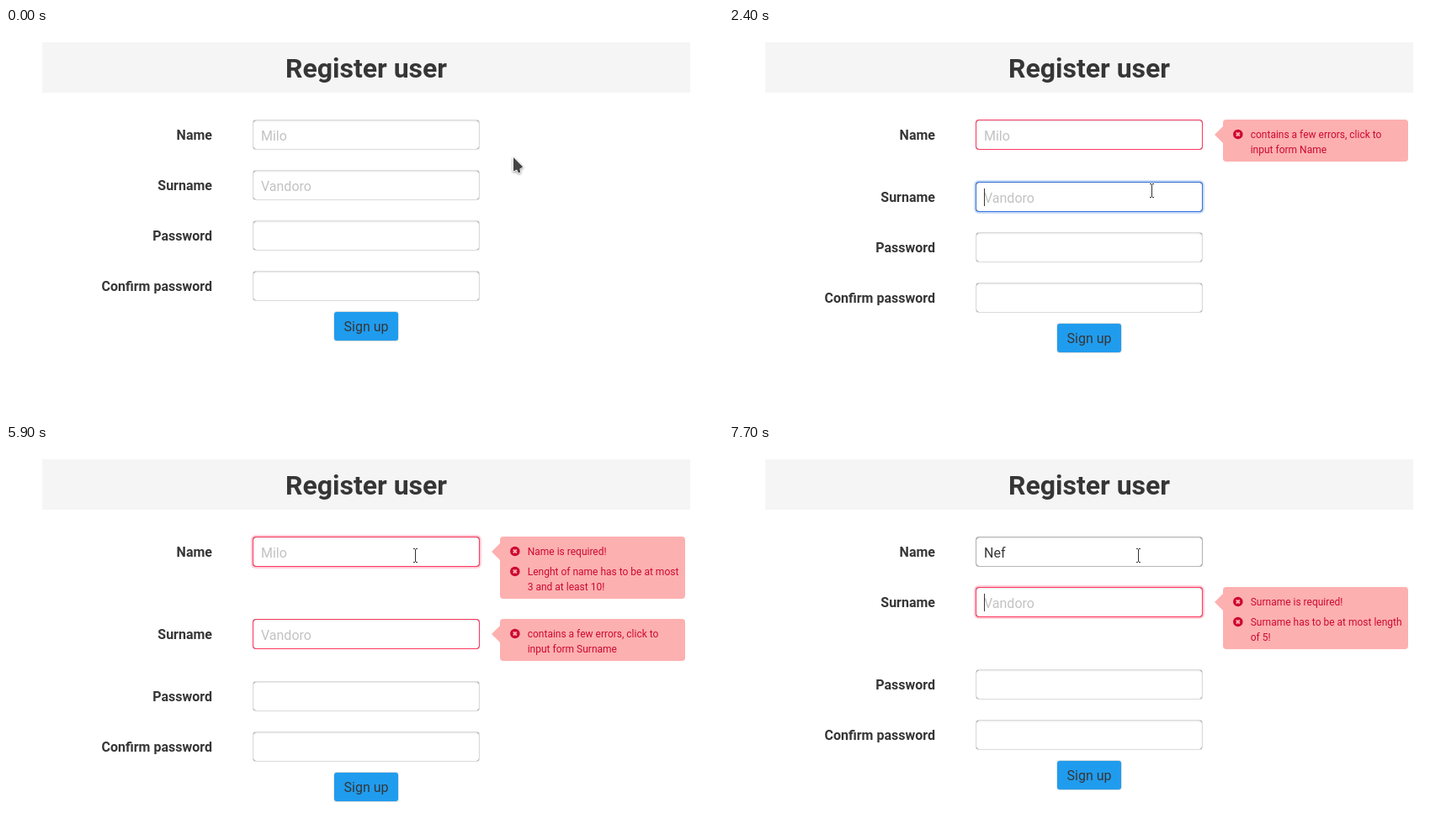
These frames come from a looping animation (852 by 463 pixels, 8000 ms). An HTML page with a canvas:

```html
<!DOCTYPE html>
<html lang="en">
<head>
<meta charset="utf-8">
<title>Register user</title>
<style>
  html, body { margin: 0; width: 100%; height: 100%; overflow: hidden; background: #fff; }
  canvas { display: block; }
</style>
</head>
<body>
<canvas id="stage" width="852" height="463"></canvas>
<script>
const ctx = document.getElementById('stage').getContext('2d');
const LOOP = 8000, STEP = 100, BLINK = 600;
const INK = '#363636', BLUE = '#3273dc', RED = '#ff3860', TIP = '#fdb0b0', ERROR = '#cd0930';
const FIELD = { x: 293, w: 270, h: 36 };
const LABELS = ['Name', 'Surname', 'Password', 'Confirm password'];
const PLACEHOLDERS = ['Milo', 'Vandoro', '', ''];

// Each tip is a list of messages, each message a list of lines.
const summary = name => [['contains a few errors, click to', 'input form ' + name]];
const nameLength = ['Lenght of name has to be at most', '3 and at least 10!'];
const nameErrors = [['Name is required!'], nameLength];
const surnameErrors = [['Surname is required!'], ['Surname has to be at most length', 'of 5!']];

const STATES = [
  { at: 0, focus: -1, text: '', tips: [] },
  { at: 1500, focus: 0, text: '', tips: [] },
  { at: 2400, focus: 1, text: '', tips: [summary('Name')] },
  { at: 4100, focus: 0, text: '', tips: [nameErrors, summary('Surname')] },
  { at: 6200, focus: 0, text: 'N', tips: [[nameLength], summary('Surname')] },
  { at: 6700, focus: 0, text: 'Ne', tips: [[nameLength], summary('Surname')] },
  { at: 7200, focus: 0, text: 'Nef', tips: [null, summary('Surname')] },
  { at: 7700, focus: 1, text: 'Nef', tips: [null, surnameErrors] }
];

const START = { x: 603, y: 154 };
const MOVES = [
  { at: 400, steps: 7, x: 499, y: 136 },
  { at: 1700, steps: 5, x: 502, y: 192 },
  { at: 2300, steps: 1, x: 502, y: 193 },
  { at: 3000, steps: 7, x: 486, y: 131 }
];

function pointerAt(t) {
  let { x, y } = START;
  for (const m of MOVES) {
    if (t < m.at) break;
    const p = Math.min(1, ((t - m.at) / STEP + 1) / m.steps);
    const e = p * p * (3 - 2 * p);
    x += (m.x - x) * e;
    y += (m.y - y) * e;
  }
  return { x: Math.round(x), y: Math.round(y) };
}

function write(text, x, y, font, color, align = 'left') {
  ctx.font = font + ' Roboto, sans-serif';
  ctx.textAlign = align;
  ctx.fillStyle = color;
  ctx.fillText(text, x, y);
}

function box(x, y, w, h, r, color) {
  ctx.fillStyle = color;
  ctx.beginPath();
  ctx.roundRect(x, y, w, h, r);
  ctx.fill();
}

function shape(points, color) {
  ctx.beginPath();
  points.forEach(([x, y]) => ctx.lineTo(x, y));
  ctx.closePath();
  ctx.fillStyle = color;
  ctx.fill();
}

function innerShadow(x, y, w, h) {
  ctx.save();
  ctx.beginPath();
  ctx.roundRect(x, y, w, h, 3);
  ctx.clip();
  ctx.shadowColor = 'rgba(10,10,10,.1)';
  ctx.shadowBlur = 2;
  ctx.shadowOffsetY = 1;
  ctx.beginPath();
  ctx.rect(x - 10, y - 10, w + 20, h + 20);
  ctx.roundRect(x, y, w, h, 3);
  ctx.fillStyle = '#000';
  ctx.fill('evenodd');
  ctx.restore();
}

function drawField(y, { focused, invalid, hovered, value, placeholder, caret }) {
  const { x, w, h } = FIELD;
  const border = invalid ? RED : focused ? BLUE : hovered ? '#b5b5b5' : '#dbdbdb';
  if (focused) {
    box(x - 2, y - 2, w + 4, h + 4, 6, invalid ? 'rgba(255,56,96,.25)' : 'rgba(50,115,220,.25)');
  }
  box(x, y, w, h, 4, border);
  box(x + 1, y + 1, w - 2, h - 2, 3, '#fff');
  innerShadow(x + 1, y + 1, w - 2, h - 2);
  write(value || placeholder, x + 10, y + 25, '16px', value ? INK : 'rgba(54,54,54,.3)');
  if (caret) {
    const advance = value ? Math.round(ctx.measureText(value).width) : 0;
    ctx.fillStyle = INK;
    ctx.fillRect(x + 10 + advance, y + 8, 1, 21);
  }
}

function drawErrorIcon(x, y) {
  ctx.beginPath();
  ctx.arc(x, y, 5.8, 0, 7);
  ctx.fillStyle = ERROR;
  ctx.fill();
  ctx.beginPath();
  for (const d of [-2, 2]) {
    ctx.moveTo(x - 2, y - d);
    ctx.lineTo(x + 2, y + d);
  }
  ctx.strokeStyle = TIP;
  ctx.lineWidth = 1.8;
  ctx.stroke();
}

function tipHeight(tip) {
  return tip ? 8 + tip.reduce((sum, lines) => sum + 6 + 18 * lines.length, 0) : 0;
}

function drawTip(tip, y) {
  box(587, y, 220, tipHeight(tip), 4, TIP);
  shape([[577, y + 18], [587, y + 8], [587, y + 28]], TIP);
  let baseline = y + 22;
  for (const lines of tip) {
    drawErrorIcon(604.8, baseline - 4.5);
    for (const line of lines) {
      write(line, 619.7, baseline, '12px', ERROR);
      baseline += 18;
    }
    baseline += 6;
  }
}

function drawArrow(x, y) {
  ctx.save();
  ctx.translate(x, y);
  ctx.lineJoin = 'round';
  ctx.shadowColor = 'rgba(0,0,0,.35)';
  ctx.shadowBlur = 3;
  ctx.shadowOffsetY = 1;
  const outline = [[0, 0], [0, 16.5], [4, 14.5], [6, 18.5], [8.3, 17.5], [7.4, 13.7], [11.2, 11.2]];
  shape(outline, '#444');
  ctx.strokeStyle = '#fff';
  ctx.lineWidth = 1.6;
  ctx.stroke();
  ctx.shadowColor = 'transparent';
  shape(outline, '#444');
  ctx.restore();
}

function drawBeam(x, y) {
  const bars = [[x, y - 7, 1, 15], [x - 2, y - 8, 2, 1], [x + 1, y - 8, 2, 1],
    [x - 2, y + 8, 2, 1], [x + 1, y + 8, 2, 1]];
  ctx.fillStyle = 'rgba(255,255,255,.7)';
  for (const [bx, by, w, h] of bars) ctx.fillRect(bx - 1, by - 1, w + 2, h + 2);
  ctx.fillStyle = '#333';
  for (const bar of bars) ctx.fillRect(...bar);
}

function draw(t) {
  const state = STATES.findLast(s => s.at <= t);
  const pointer = pointerAt(t);
  const caretOn = Math.floor((t - state.at) / BLINK) % 2 === 0;
  let overField = false, y = 109;

  ctx.fillStyle = '#fff';
  ctx.fillRect(0, 0, 852, 463);
  ctx.fillStyle = '#f5f5f5';
  ctx.fillRect(43, 17, 770, 60);
  write('Register user', 428, 59, 'bold 32px', INK, 'center');

  LABELS.forEach((label, i) => {
    const tip = state.tips[i];
    const focused = state.focus === i;
    const hovered = pointer.x >= FIELD.x && pointer.x < FIELD.x + FIELD.w &&
      pointer.y >= y && pointer.y < y + FIELD.h;
    overField ||= hovered;
    write(label, 245, y + 24, 'bold 16px', INK, 'right');
    drawField(y, {
      focused, hovered, invalid: !!tip,
      value: i === 0 ? state.text : '',
      placeholder: PLACEHOLDERS[i],
      caret: focused && caretOn
    });
    if (tip) drawTip(tip, y);
    y += Math.max(FIELD.h, tipHeight(tip)) + 24;
  });

  const buttonY = y - 12;
  box(389.3, buttonY, 77.4, 36, 4, '#dbdbdb');
  box(390, buttonY + 1, 76, 34, 3, '#209cee');
  write('Sign up', 428, buttonY + 24, '16px', INK, 'center');

  (overField ? drawBeam : drawArrow)(pointer.x, pointer.y);
}

const origin = performance.now();
function tick() {
  const t = (performance.now() - origin) % LOOP;
  draw(Math.floor(t / STEP) * STEP);
  requestAnimationFrame(tick);
}
tick();
</script>
</body>
</html>
```
